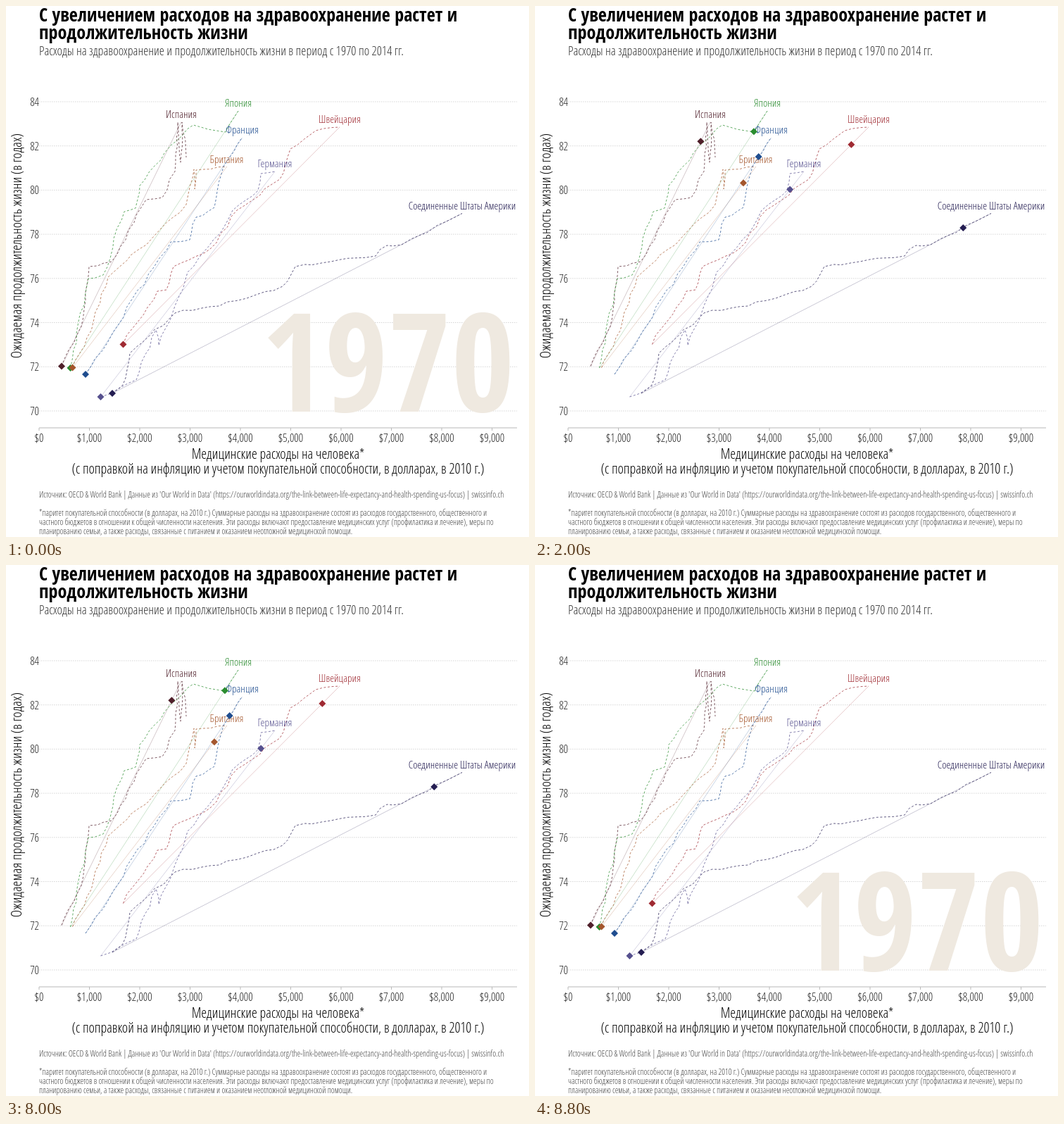
Write an HTML page that moves like this. It is 743 by 754 pixels and loops after 10000 ms.

```html
<!DOCTYPE html>
<html lang="ru">
<head>
<meta charset="utf-8">
<title>Расходы на здравоохранение</title>
<style>
html, body { margin: 0; width: 100%; height: 100%; overflow: hidden; background: #fff; }
svg { display: block; width: 743px; height: 754px; }
text {
  font-family: "Open Sans Condensed Light", "Open Sans", "Noto Sans", sans-serif;
  font-stretch: 75%; font-weight: 300; white-space: pre;
}
.title, .year { font-family: "Open Sans Condensed", "Open Sans", "Noto Sans", sans-serif; font-weight: 700; }
.title { font-size: 26.1px; fill: #000; }
.year { font-size: 194px; fill: #efe9e0; }
.sub { font-size: 18px; fill: #333; }
.tick { font-size: 16px; fill: #222; }
.axis { font-size: 20px; fill: #000; }
.note { font-size: 11.9px; fill: #444; }
.name { font-size: 15.1px; }
.grid { stroke: #d6d6d6; stroke-dasharray: 1.5 1.5; }
.rule { stroke: #b8b8b8; }
.trail { fill: none; stroke-dasharray: 3 2.6; opacity: .72; }
.direct { stroke-width: .8; opacity: .3; }
</style>
</head>
<body>
<svg id="chart" viewBox="0 0 743 754"></svg>
<script>
const chart = document.getElementById('chart');

function add(tag, attrs, content = '') {
  const el = document.createElementNS('http://www.w3.org/2000/svg', tag);
  for (const key in attrs) el.setAttribute(key, attrs[key]);
  el.textContent = content;
  return chart.appendChild(el);
}
const label = (cls, x, y, content, anchor = 'start', more = {}) =>
  add('text', { class: cls, x, y, 'text-anchor': anchor, ...more }, content);
const line = (cls, [x1, y1], [x2, y2], more = {}) =>
  add('line', { class: cls, x1, y1, x2, y2, ...more });
const mix = (a, b, p) => a.map((v, i) => v + (b[i] - v) * p);

// Headings
label('title', 47, 22, 'С увеличением расходов на здравоохранение растет и');
label('title', 47, 47, 'продолжительность жизни');
label('sub', 47, 70, 'Расходы на здравоохранение и продолжительность жизни в период с 1970 по 2014 гг.');

// Axes
for (let age = 70; age <= 84; age += 2) {
  const y = 575 - (age - 70) * 31.36;
  line('grid', [47, y], [726, y]);
  label('tick', 47, y + 6, age, 'end');
}
const year = label('year', 363, 576, '1970');
line('rule', [47, 599], [726, 599]);
for (let k = 0; k < 10; k++) {
  const x = 47 + k * 71.5;
  line('rule', [x, 599], [x, 603]);
  label('tick', x, 619, k ? `$${k},000` : '$0', 'middle');
}
label('axis', 386.5, 643, 'Медицинские расходы на человека*', 'middle');
label('axis', 386.5, 664, '(с поправкой на инфляцию и учетом покупательной способности, в долларах, в 2010 г.)', 'middle');
label('axis', 0, 0, 'Ожидаемая продолжительность жизни (в годах)', 'middle',
  { transform: 'translate(21.5 340.5) rotate(-90)' });

// Notes
label('note', 47, 698, "Источник: OECD & World Bank | Данные из 'Our World in Data' (https://ourworldindata.org/the-link-between-life-expectancy-and-health-spending-us-focus) | swissinfo.ch");
[
  '*паритет покупательной способности (в долларах, на 2010 г.) Суммарные расходы на здравоохранение состоят из расходов государственного, общественного и',
  'частного бюджетов в отношении к общей численности населения. Эти расходы включают предоставление медицинских услуг (профилактика и лечение), меры по',
  'планированию семьи, а также расходы, связанные с питанием и оказанием неотложной медицинской помощи.'
].forEach((row, i) => label('note', 47, 723.5 + i * 13, row));

// Small repeatable wobble between the turning points of a trail
let seed = 7;
const wobble = () => {
  seed = seed * 16807 % 2147483647;
  return (seed / 2147483647 - .5) * 4;
};
function trailPath(turns) {
  const points = [turns[0]];
  for (let i = 1; i < turns.length; i++) {
    const [a, b] = [turns[i - 1], turns[i]];
    const parts = Math.ceil(Math.hypot(b[0] - a[0], b[1] - a[1]) / 14);
    for (let k = 1; k < parts; k++) points.push(mix(a, b, k / parts).map(v => v + wobble()));
    points.push(b);
  }
  return 'M' + points.map(p => p.map(v => v.toFixed(1)).join(' ')).join('L');
}

const countries = [];
function country(name, color, turns, to = turns.at(-1)) {
  const from = turns[0];
  line('direct', from, to, { stroke: color });
  add('path', { class: 'trail', stroke: color, d: trailPath(turns) });
  countries.push({ name, color, from, to });
}
country('Испания', '#4f1f2a', [[79, 511.5], [107, 455], [118, 370], [150, 363], [199, 275], [222, 272],
  [240, 235], [244, 165], [248, 222], [250, 165], [256, 215]], [249, 164.5]);
country('Япония', '#2a8c2f', [[91.5, 514], [117, 387], [138, 382], [168, 292], [184, 287], [190, 255],
  [234, 198], [266, 169], [312, 179], [330, 149]]);
country('Британия', '#a4562c', [[94.5, 513.5], [115, 471], [145, 385], [188, 346], [256, 282], [267, 232],
  [268, 260], [270, 233], [313.5, 228.5]]);
country('Франция', '#1f4d8f', [[113, 523], [234, 335], [261, 332], [270, 300], [296, 286], [309, 228], [335.5, 187]]);
country('Швейцария', '#9f2a32', [[166.5, 480.5], [215, 405], [228, 403], [238, 370], [290, 345], [328, 290],
  [389, 246], [404, 203], [440, 177], [474, 172]]);
country('Германия', '#56508e', [[134.5, 555], [185, 531], [213, 460], [217, 482], [246, 412], [258, 378],
  [304, 323], [322, 290], [358, 262], [362, 238], [382, 235]]);
country('Соединенные Штаты Америки', '#241d52', [[151, 550], [166, 538], [176, 493], [240, 436], [303, 426],
  [393, 398], [411, 370], [525, 355], [541, 340], [562, 339], [648, 294.5]]);

for (const { name, color, to: [x, y] } of countries)
  label('name', x, y - 6, name, 'middle', { fill: color });
for (const c of countries)
  c.mark = add('path', { d: 'M-5 0L0-5 5 0 0 5Z', fill: c.color });

// Five hard steps each way, eased quadratically
const easeInOut = t => t < .5 ? 2 * t * t : 1 - 2 * (1 - t) ** 2;
const clampStep = n => Math.max(0, Math.min(5, Math.floor(n)));

function draw(time) {
  const t = time % 10000;
  const step = t < 6000 ? clampStep((t - 1200) / 200) : 5 - clampStep((t - 7800) / 200);
  const p = easeInOut(step / 5);
  year.textContent = step === 0 ? '1970' : step === 5 ? '2014' : '';
  for (const { mark, from, to } of countries)
    mark.setAttribute('transform', `translate(${mix(from, to, p).join(' ')})`);
}

const start = performance.now();
function tick() {
  draw(performance.now() - start);
  requestAnimationFrame(tick);
}
tick();
</script>
</body>
</html>
```
